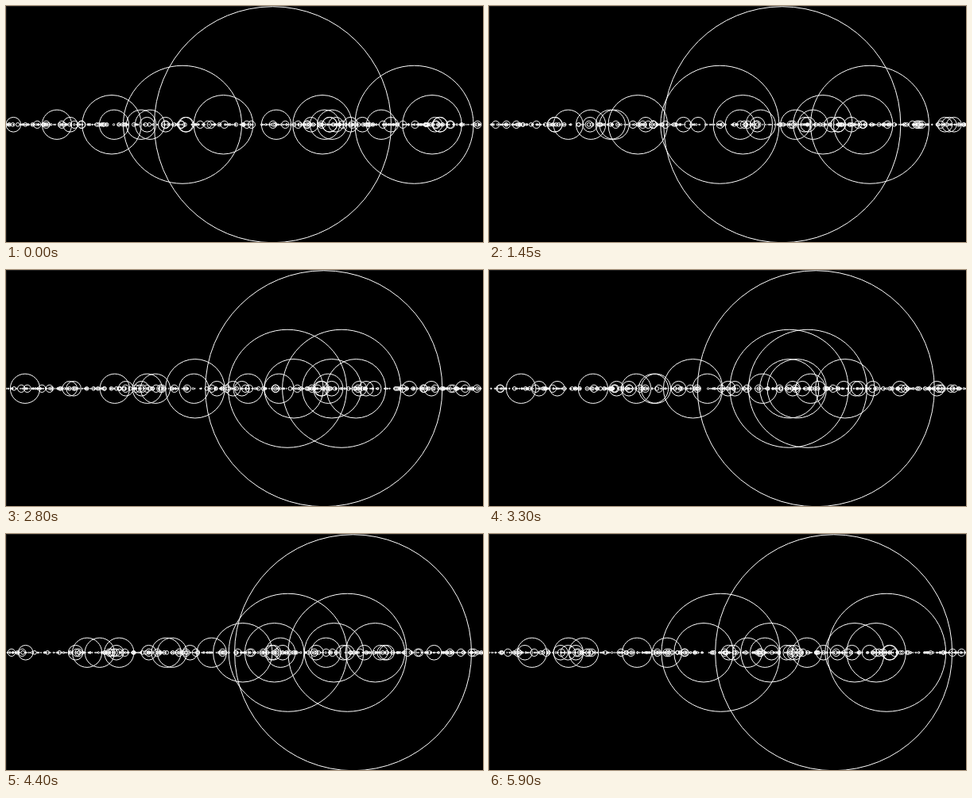
An HTML page with a canvas that plays this animation: 600x298 px, repeating every 5950 ms.

```html
<!DOCTYPE html>
<html>
<head>
<meta charset="utf-8">
<style>
html, body { margin: 0; width: 100%; height: 100%; overflow: hidden; background: #000; }
canvas { display: block; }
</style>
</head>
<body>
<canvas id="stage" width="600" height="298"></canvas>
<script>
const ctx = document.getElementById('stage').getContext('2d');
const STEP = 50, STEPS = 119, LEVELS = 9, MAX_SPEED = 3;
const LEFT = -0.5, RIGHT = 601.3, MID = 149.75, RADIUS = 149;

// Start position and speed per step of the large circles.
const large = [
  [335.5, 1.148],
  [222, 2.357], [513.5, 2.107],
  [133, 1.873], [273.5, 1.58], [398, 0.755], [536, -2.254],
  [181, -2.804], [64, 2.212], [472, -2.99], [401, -2.94],
  [136, 0.745], [170, -0.593], [340, 0.06], [410, -0.085]
];

let seed = 7;
function random(lo, hi) {
  seed = (seed * 16807) % 2147483647;
  return lo + (hi - lo) * seed / 2147483647;
}

// Level k holds 2^k circles of radius RADIUS / 2^k; the small ones are random.
const circles = [];
for (let level = 0; level < LEVELS; level++) {
  const count = 2 ** level, r = RADIUS / count;
  for (let i = 0; i < count; i++) {
    const [x, v] = large[circles.length] ||
      [random(r, 600 - r), random(-MAX_SPEED, MAX_SPEED)];
    circles.push({ r, x, v });
  }
}

// Constant speed between two walls, folded into a triangle wave.
function bounce(x, lo, hi) {
  const span = hi - lo;
  const u = (((x - lo) % (2 * span)) + 2 * span) % (2 * span);
  return lo + (u > span ? 2 * span - u : u);
}

function draw(now) {
  const n = Math.floor(now / STEP) % STEPS;
  // A faint edge shows along the top and left.
  ctx.fillStyle = '#1c1c1c';
  ctx.fillRect(0, 0, 600, 298);
  ctx.fillStyle = '#000';
  ctx.fillRect(1, 1, 599, 297);
  ctx.strokeStyle = '#fff';
  for (const { x, v, r } of circles) {
    ctx.beginPath();
    ctx.arc(bounce(x + v * n, LEFT + r, RIGHT - r), MID, r, 0, 2 * Math.PI);
    ctx.stroke();
  }
}

const begin = performance.now();
function tick() {
  draw(performance.now() - begin);
  requestAnimationFrame(tick);
}
tick();
</script>
</body>
</html>
```
